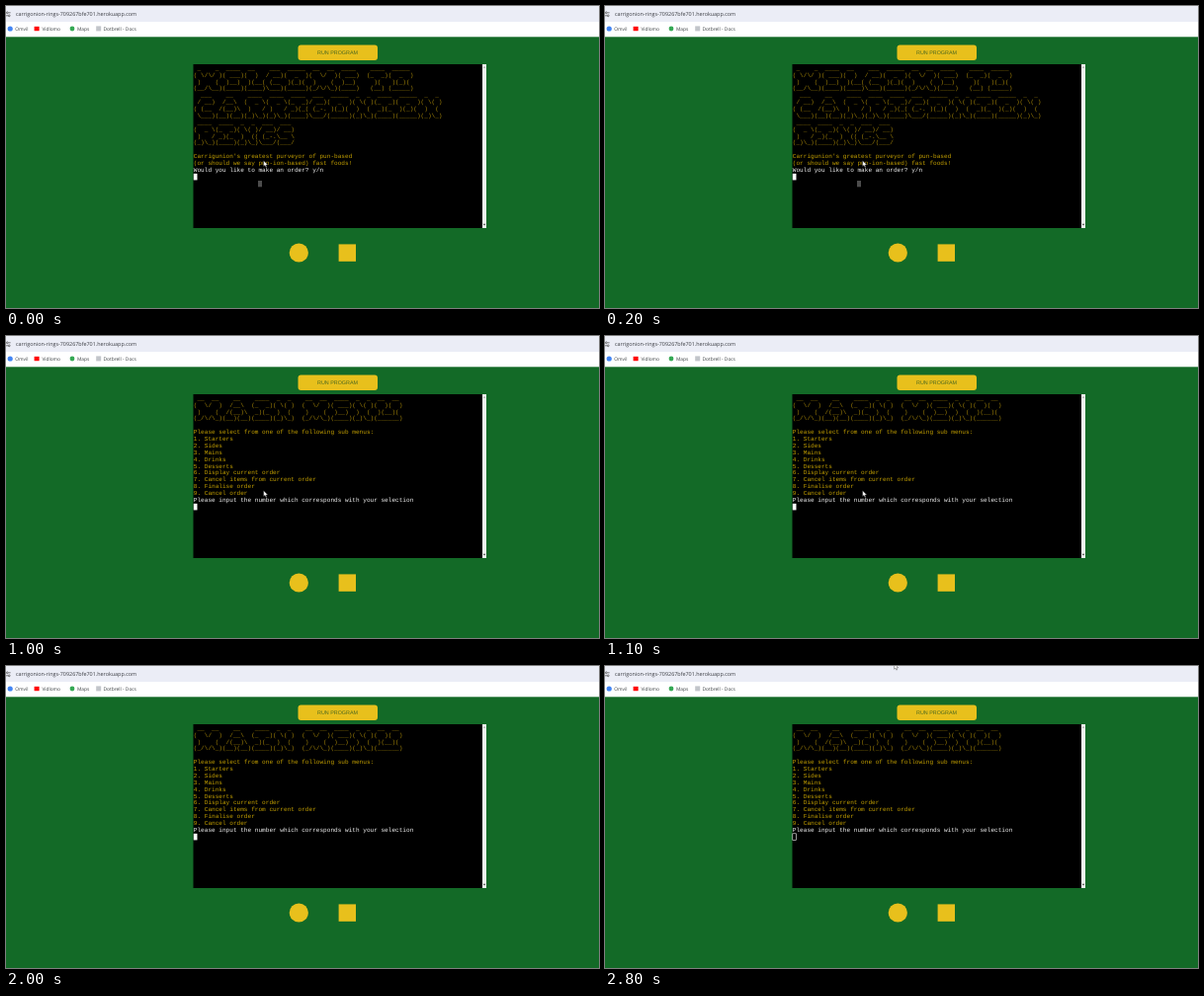
Animation, 600 px wide and 306 px high, one loop 2900 ms. Source, as an HTML page:

```html
<!DOCTYPE html>
<html lang="en">
<head>
<meta charset="utf-8">
<title>Terminal order</title>
<style>
  html, body { margin: 0; width: 100%; height: 100%; overflow: hidden; background: #136a27; }
  svg { display: block; width: 100%; height: 100%; }
  text { white-space: pre; text-rendering: geometricPrecision; }
  .bar { font-family: "Open Sans", "Noto Sans", sans-serif; fill: #3c4043; }
  .url { font-size: 5.42px; fill: #3a3c42; }
  .mark { font-size: 4.85px; }
  .btn { font: 5.4px "Liberation Sans", Arial, sans-serif; fill: #4a671f; text-anchor: middle; }
  .term { font: 6.08px "Liberation Mono", "Courier New", monospace; fill: #c4a000; }
  .term .plain { fill: #f4f4f4; }
  .term .art { fill: #a58608; }
</style>
</head>
<body>
<svg viewBox="0 0 600 306">
  <rect width="600" height="306" fill="#136a27"/>

  <rect width="600" height="31.3" fill="#fff"/>
  <rect width="600" height="16" fill="#ebedf6"/>
  <g fill="none" stroke="#444" stroke-width=".7">
    <path d="M2.4 6.8H4.6M0 9.8H2"/>
    <circle cx="1.3" cy="6.8" r=".9"/>
    <circle cx="3.2" cy="9.8" r=".9"/>
  </g>
  <text class="bar url" x="10" y="10.2">carrigonion-rings-709267bfe701.herokuapp.com</text>
  <circle cx="4.2" cy="23" r="2.6" fill="#4285f4"/>
  <rect x="28.6" y="20.8" width="5" height="4.4" fill="#f00"/>
  <circle cx="67" cy="23" r="2.4" fill="#34a853"/>
  <rect x="91.2" y="20.4" width="5" height="5" fill="#c2c5ca"/>
  <g class="bar mark">
    <text x="9.3" y="24.8">Omvil</text>
    <text x="36.4" y="24.8">Vidlomo</text>
    <text x="72" y="24.8">Maps</text>
    <text x="98.6" y="24.8">Dotbrell - Docs</text>
  </g>

  <rect x="295.5" y="39.5" width="80.5" height="15.6" rx="3" fill="#e8c01c"/>
  <text class="btn" x="335.5" y="49.2">RUN PROGRAM</text>

  <rect x="189.5" y="59" width="296.5" height="166" fill="#000"/>
  <rect x="482" y="59" width="4" height="166" fill="#f3f3f3"/>
  <path d="M482.6 62.8H485.4L484 61Z" fill="#aaa"/>
  <path d="M482.6 220.8H485.4L484 222.6Z" fill="#444"/>
  <g id="welcome" class="term"></g>
  <g id="menu" class="term"></g>
  <text id="typed" class="term"><tspan class="plain">y</tspan></text>
  <rect id="ghost" x="255" y="177" width="4" height="6.3" fill="#4c4c4c"/>
  <rect id="caret" y="169.8" width="3.7" height="6.6" stroke="#fff"/>

  <circle cx="296.3" cy="250" r="9.6" fill="#e8c01c"/>
  <rect x="336.6" y="241.4" width="17.4" height="17.4" fill="#e8c01c"/>

  <path id="mouse" d="M0 0V5.6L1.3 4.5 2.2 6.5 3.1 6.1 2.3 4.1H4.1Z" fill="#fff" stroke="#333" stroke-width=".4"/>
</svg>
<script>
const LOOP = 2900, LEFT = 189.8, BASE = 64.9, ROW = 6.86, CHAR = 3.648;
const $ = id => document.getElementById(id);
const raw = String.raw;

// Four rows per letter, split by "|".
const GLYPHS = {
  A: raw`   __   |  /__\  | /(__)\ |(__)(__)`,
  C: raw`  ___ | / __)|( (__ | \___)`,
  E: raw` ____ |( ___)| )__) |(____)`,
  G: raw`  ___ | / __)|( (_-.| \___/`,
  I: raw` ____ |(_  _)| _)(_ |(____)`,
  L: raw` __   |(  )  | )(__ |(____)`,
  M: raw` __  __ |(  \/  )| )    ( |(_/\/\_)`,
  N: raw` _  _ |( \( )| )  ( |(_)\_)`,
  O: raw` _____ |(  _  )| )(_)( |(_____)`,
  R: raw` ____ |(  _ \| )   /|(_)\_)`,
  S: raw` ___ |/ __)|\__ \|(___/`,
  T: raw` ____ |(_  _)|  )(  | (__) `,
  U: raw` __  __ |(  )(  )| )(__)( |(______)`,
  W: raw` _    _ |( \/\/ )| )    ( |(__/\__)`
};

// Push a letter left until it touches the word so far.
function join(word, glyph) {
  const gap = Math.min(...word.map((row, i) =>
    row.length - row.trimEnd().length + glyph[i].length - glyph[i].trimStart().length));
  return word.map((row, i) => {
    const end = row.trimEnd(), cut = Math.min(gap, row.length - end.length);
    return row.slice(0, row.length - cut) + glyph[i].slice(gap - cut);
  });
}

function banner(text) {
  const words = text.split(" ").map(w =>
    [...w].map(c => GLYPHS[c].split("|")).reduce(join));
  return [0, 1, 2, 3].map(i => words.map(w => w[i]).join("  "));
}

function place(el, row) {
  el.setAttribute("x", LEFT);
  el.setAttribute("y", BASE + row * ROW);
}

// Banner rows come first; the last line of a screen is the white prompt.
function print(id, art, lines) {
  const all = [...art, "", ...lines];
  all.forEach((line, row) => {
    const el = document.createElementNS("http://www.w3.org/2000/svg", "text");
    el.textContent = line;
    if (row < art.length) el.setAttribute("class", "art");
    if (row === all.length - 1) el.setAttribute("class", "plain");
    place(el, row);
    $(id).append(el);
  });
}

print("welcome", ["WELCOME TO", "CARRIGONION", "RINGS"].flatMap(banner), [
  "Carrigunion's greatest purveyor of pun-based",
  "(or should we say pun-ion-based) fast foods!",
  "Would you like to make an order? y/n"
]);

const choices = ["Starters", "Sides", "Mains", "Drinks", "Desserts", "Display current order",
  "Cancel items from current order", "Finalise order", "Cancel order"];
print("menu", banner("MAIN MENU"), [
  "Please select from one of the following sub menus:",
  ...choices.map((c, i) => `${i + 1}. ${c}`),
  "Please input the number which corresponds with your selection"
]);
place($("typed"), 16);

const show = (id, on) => $(id).setAttribute("visibility", on ? "visible" : "hidden");

function mouseAt(t) {
  if (t < 1800) return [260.7, 156.8];
  if (t < 1900) return [447.4, 103];
  return t < 2700 ? null : [292.6, -2.4];
}

function draw(t) {
  const typed = t >= 400 && t < 1000, blurred = t >= 2600;
  show("welcome", t < 1000);
  show("menu", t >= 1000);
  show("typed", typed);
  show("ghost", t < 300);

  const caret = $("caret");
  caret.setAttribute("x", LEFT + (typed ? CHAR : 0));
  caret.setAttribute("fill", blurred ? "none" : "#fff");
  caret.setAttribute("stroke-width", blurred ? 0.6 : 0);

  const pos = mouseAt(t);
  show("mouse", pos);
  if (pos) $("mouse").setAttribute("transform", `translate(${pos})`);
}

const start = performance.now();
function tick() {
  draw((performance.now() - start) % LOOP);
  requestAnimationFrame(tick);
}
tick();
</script>
</body>
</html>
```
